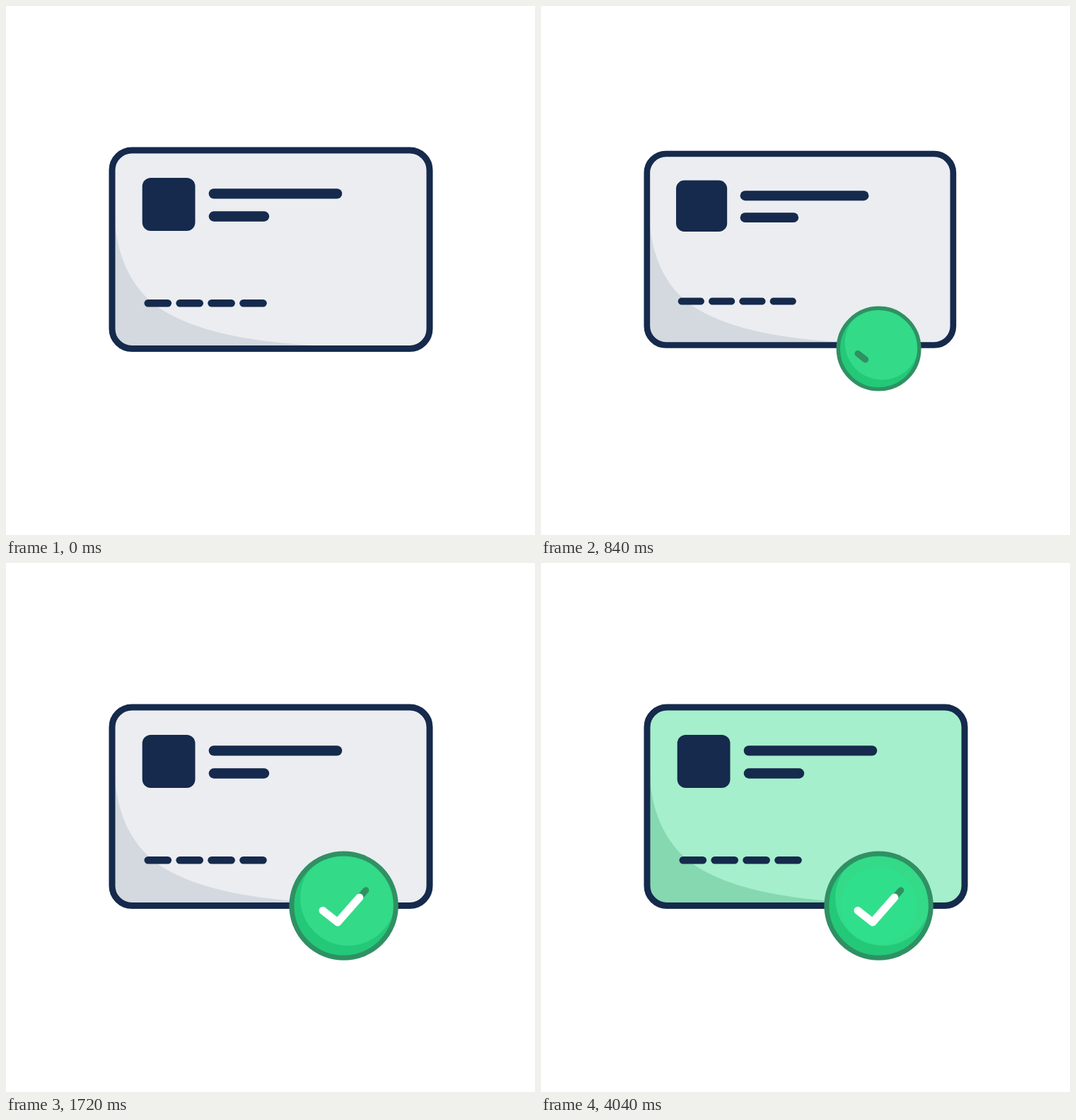
Animation of 748x748 px, one loop 4820 ms. Source, as an HTML page:

```html
<!DOCTYPE html>
<html lang="en">
<head>
<meta charset="utf-8">
<title>Card approved</title>
<style>
  html, body { margin: 0; width: 100%; height: 100%; overflow: hidden; background: #fff; }
  svg { display: block; width: 100%; height: 100%; }
</style>
</head>
<body>
<svg viewBox="0 0 748 748">
  <defs>
    <clipPath id="inside"><rect x="150" y="204" width="449" height="280.5" rx="28"/></clipPath>
    <clipPath id="disc"><circle r="72"/></clipPath>
  </defs>
  <g id="card">
    <g clip-path="url(#inside)">
      <rect id="face" x="150" y="204" width="449" height="281"/>
      <path id="shade" d="M150 300H154.500V312C160 360 178 394 206 419C250 455 330 474 436 480V486H150Z"/>
    </g>
    <rect x="150" y="204" width="449" height="280.500" rx="28" fill="none" stroke="#152a4c" stroke-width="9"/>
    <g fill="#152a4c">
      <rect x="192.700" y="243" width="74.800" height="75" rx="12"/>
      <rect x="286.700" y="258.200" width="188.500" height="14.400" rx="7.200"/>
      <rect x="286.700" y="290.300" width="85.500" height="14.400" rx="7.200"/>
      <g id="dashes"></g>
    </g>
  </g>
  <g id="badge">
    <circle r="73.700" fill="#23c978"/>
    <circle cx="6" cy="-11" r="67.500" fill="#33da88" clip-path="url(#disc)"/>
    <circle id="glow" r="54" fill="#30df8b"/>
    <circle r="73.700" fill="none" stroke="#2f9163" stroke-width="7"/>
  </g>
  <g fill="none" stroke-linecap="round" stroke-linejoin="round">
    <path id="under" d="M448 491.500L469 508L508.800 462.700" stroke="#2f9163" stroke-width="9"/>
    <path id="tick" d="M448 491.500L469 508L508.800 462.700" stroke="#fff" stroke-width="11"/>
  </g>
</svg>
<script>
  const LOOP = 4820;
  const $ = id => document.getElementById(id);
  const ease = u => u * u * (3 - 2 * u);

  // Eased value along [time, value] keys
  function at(keys, t) {
    if (t <= keys[0][0]) return keys[0][1];
    for (let i = 1; i < keys.length; i++) {
      const [t0, a] = keys[i - 1], [t1, b] = keys[i];
      if (t < t1) return a + (b - a) * ease((t - t0) / (t1 - t0));
    }
    return keys[keys.length - 1][1];
  }

  const badgeKeys = [[200, 0], [600, 1.37], [800, 0.75], [1000, 1]];
  const cardKeys = [[667, 1], [800, 0.96], [1000, 1]];
  const underKeys = [[755, 0], [950, 33], [1475, 87]];
  const tickKeys = [[960, 0], [1150, 33.3], [1725, 73.4]];

  const mix = (a, b, u) => `rgb(${a.map((v, i) => Math.round(v + (b[i] - v) * u))})`;

  function scale(el, x, y, s) {
    el.setAttribute('transform', `translate(${x} ${y}) scale(${s})`);
  }

  function trim(el, length) {
    el.style.display = length > 0 ? '' : 'none';
    el.setAttribute('stroke-dasharray', `${length} 200`);
  }

  for (let i = 0; i < 4; i++) {
    $('dashes').innerHTML += `<rect x="${195.5 + i * 44.9}" y="414.900" width="38.600" height="10.600" rx="5.300"/>`;
  }

  function draw(t) {
    const s = at(cardKeys, t);
    scale($('card'), 145.5 * (1 - s), 344.2 * (1 - s), s);

    const size = at(badgeKeys, t);
    $('badge').style.display = size > 0 ? '' : 'none';
    scale($('badge'), 477.6, 484.6, size);

    trim($('under'), at(underKeys, t));
    trim($('tick'), at(tickKeys, t));

    const green = Math.min(1, Math.max(0, (t - 1825) / 335));
    $('face').setAttribute('fill', mix([235, 237, 241], [165, 239, 204], green));
    $('shade').setAttribute('fill', mix([211, 217, 223], [134, 216, 177], green));
    $('glow').setAttribute('opacity', green);
  }

  const start = performance.now();
  function tick() {
    draw((performance.now() - start) % LOOP);
    requestAnimationFrame(tick);
  }
  draw(0);
  requestAnimationFrame(tick);
</script>
</body>
</html>
```
